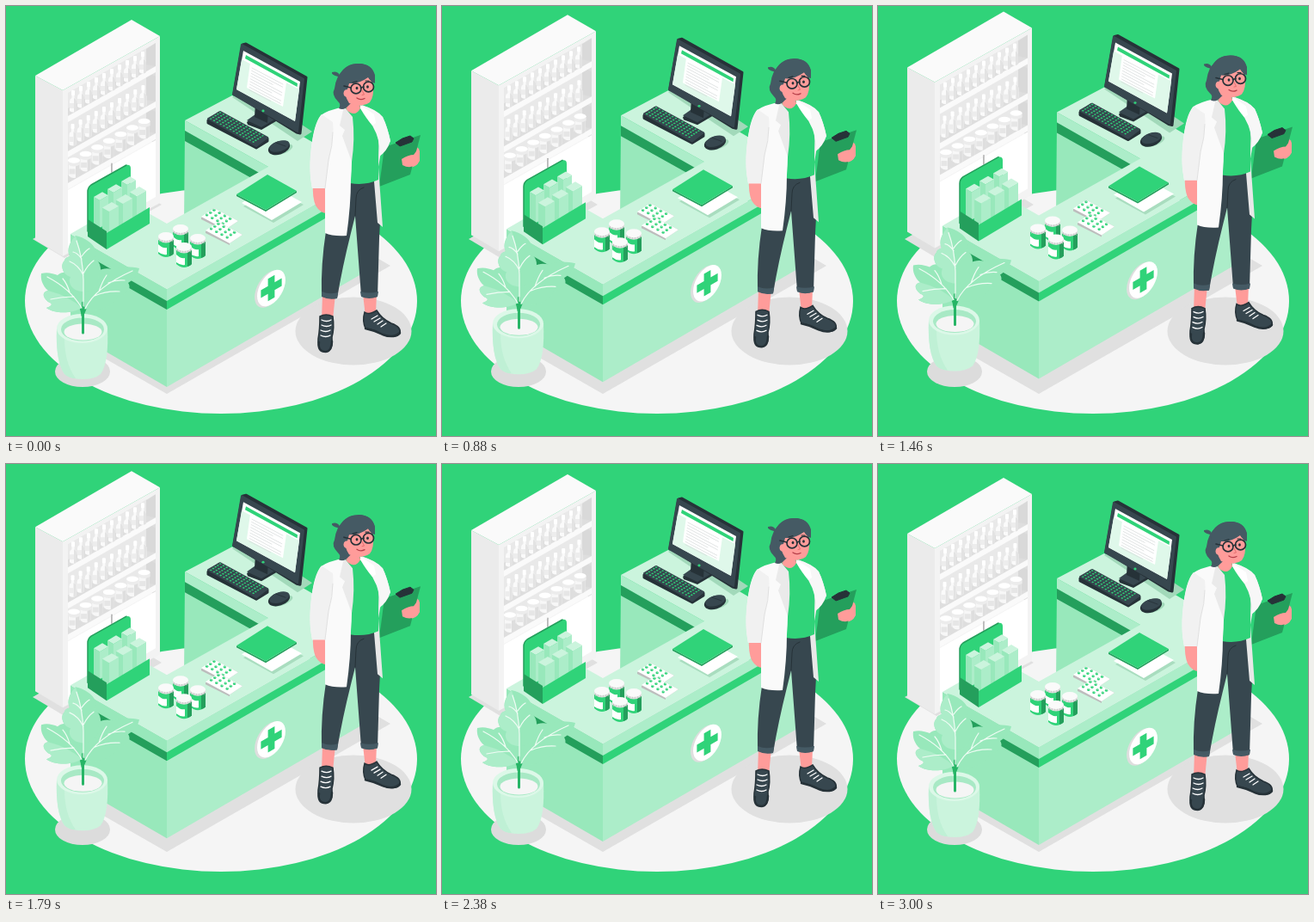
Animation, 500 px wide and 500 px high, one loop 3040 ms. Source, as an HTML page:

```html
<!DOCTYPE html>
<html lang="en">
<head>
<meta charset="utf-8">
<title>Pharmacy counter</title>
<style>
html, body { margin: 0; width: 100%; height: 100%; overflow: hidden; background: #30d379; }
svg { display: block; width: 100vw; height: 100vh; }
</style>
</head>
<body>
<svg id="stage" viewBox="0 0 500 500"></svg>
<script>
const GREEN = '#30d379', DEEP = '#249f5c', MINT = '#acedc9', PALE = '#cbf4dd', SOFT = '#98e8bb';
const DARK = '#37474f', SLATE = '#455a64', INK = '#263238', SKIN = '#ff9c9a', SHADE = '#e0e0e0';

const poly = (points, fill, extra = '') => `<polygon points="${points}" fill="${fill}" ${extra}/>`;
const path = (d, fill, extra = '') => `<path d="${d}" fill="${fill}" ${extra}/>`;
const line = (d, color, width = 1) =>
  `<path d="${d}" fill="none" stroke="${color}" stroke-width="${width}" stroke-linecap="round" stroke-linejoin="round"/>`;
const oval = (x, y, rx, ry, fill, extra = '') =>
  `<ellipse cx="${x}" cy="${y}" rx="${rx}" ry="${ry}" fill="${fill}" ${extra}/>`;
const group = (transform, body) => `<g transform="${transform}">${body}</g>`;
const repeat = (n, draw) => Array.from({ length: n }, (_, i) => draw(i)).join('');
const rounded = (color, width) => `stroke="${color}" stroke-width="${width}" stroke-linejoin="round"`;

// Isometric block standing on its nearest bottom corner
function block(x, y, left, right, height, colors) {
  const k = 0.577, top = y - height;
  const lx = x - left, ly = left * k, rx = x + right, ry = right * k;
  return poly(`${x},${y} ${lx},${y - ly} ${lx},${top - ly} ${x},${top}`, colors[0]) +
    poly(`${x},${y} ${rx},${y - ry} ${rx},${top - ry} ${x},${top}`, colors[1]) +
    poly(`${x},${top} ${lx},${top - ly} ${x - left + right},${top - ly - ry} ${rx},${top - ry}`, colors[2]);
}

function ground() {
  return oval(250, 343, 228, 131, '#f5f5f5') +
    poly('31,271 68,293 181,231 145,209', SHADE) +
    poly('75,387 187,451 447,302 411,281', SHADE) +
    oval(404, 378, 67.5, 39.5, SHADE) +
    oval(89, 425, 32, 18, '#dcdcdc');
}

const flask = (x, y) => group(`translate(${x} ${y})`,
  path('M-4 -1V-12Q-4 -15 -1.6 -16V-21H1.6V-16Q4 -15 4 -12V-1Q0 2 -4 -1', '#fafafa') +
  path('M1 .5V-16Q4 -15 4 -12V-1Q3 .3 1 .5', '#e3e3e3') +
  `<rect x="-2" y="-25" width="4" height="6" rx="1" fill="#fff"/>` +
  `<rect x="-4" y="-10" width="5" height="6" fill="#ededed"/>`);

const jar = (x, y) => group(`translate(${x} ${y})`,
  path('M-6 -2V-15H6V-2Q0 3 -6 -2', '#f7f7f7') +
  path('M2 .5V-15H6V-2Q4 .2 2 .5', '#dedede') +
  `<rect x="-5.5" y="-10" width="7" height="6" fill="#e6e6e6"/>` +
  path('M-7 -15V-20H7V-15Q0 -11 -7 -15', '#ececec') + oval(0, -20, 7, 3.2, '#fff'));

function shelf() {
  const board = y => poly(`72,${y} 163,${y - 52} 174,${y - 46} 174,${y - 51} 174,${y - 58} 163,${y - 60} 72,${y - 9}`, '#dedede') +
    poly(`72,${y} 174,${y - 58} 174,${y - 51} 72,${y + 7}`, '#fafafa');
  return poly('34,81 66,98 66,291 34,272', '#ebebeb') +
    poly('66,98 179,35 179,229 66,291', '#f3f3f3') +
    poly('72,101 174,43 174,152 72,208', '#e9e9e9') +
    poly('163,50 174,43 174,152 163,158', '#d9d9d9') +
    poly('34,81 146,16 179,35 66,98', '#fafafa') +
    [128, 169, 206].map(board).join('') +
    repeat(10, i => flask(78 + 9 * i, 123 - 5 * i)) +
    repeat(10, i => flask(77.5 + 9.1 * i, 162 - 5 * i)) +
    repeat(7, i => jar(79 + 13.6 * i, 199.5 - 7.6 * i)) +
    poly('72,214 174,156 174,222 72,281', '#fff') +
    line('M122.500 185V252', SHADE) + line('M123 183V193', '#9e9e9e', 1.2);
}

function counter() {
  return poly('208,145 305,199 305,195 207,254', SOFT) +
    poly('208,133 305,187 305,200 208,145', MINT) +
    poly('208,145 305,200 305,211 208,157', DEEP) +
    poly('75,285 187,349 187,443 75,378', SOFT) +
    poly('187,349 411,221 411,313 187,443', MINT) +
    poly('75,277 187,341 187,353 75,289', DEEP) +
    poly('187,341 411,212 411,224 187,353', GREEN) +
    poly('75,265 187,329 187,343 75,279', SOFT) +
    poly('187,329 411,201 411,214 187,343', MINT) +
    poly('208,133 263,104 411,190 411,201 187,329 75,265 141,227 187,253 305,187', PALE) +
    group('matrix(.866 -.5 0 1 306 329)', '<circle r="19.500" fill="#dedede"/>') +
    group('matrix(.866 -.5 0 1 308.500 328)', '<circle r="19" fill="#fff"/>' +
      path('M-4.500 -13H4.500V-4.500H14V4.500H4.500V13H-4.500V4.500H-14V-4.500H-4.500Z', GREEN));
}

function carton() {
  const pack = [SOFT, MINT, PALE];
  return path('M95 268V216Q95 211 99 208L140 185Q145 184 145 189V242Z', GREEN) +
    line('M95 262V216Q95 211 99 208L140 185', DEEP, 1.5) +
    repeat(3, i => block(109 + 16 * (2 - i), 258 - 9 * (2 - i), 7, 10, 32, pack)) +
    repeat(3, i => block(120 + 16 * (2 - i), 270 - 9 * (2 - i), 8, 11, 31, pack)) +
    poly('95,248 117,262 117,283 95,268', DEEP) +
    poly('117,264 167,234 167,253 117,283', GREEN);
}

function computer() {
  const lines = repeat(9, i => line(`M${286 - i * .4} ${72 + 3.2 * i}l${i % 3 == 2 ? 25 : 36} ${i % 3 == 2 ? 13 : 19}`, '#d5d8d8', .7));
  const keys = repeat(5, r => repeat(14, c =>
    poly('-1.300,-.1 .2,-1.100 1.800,-.2 .3,.8', GREEN, `transform="translate(${238 + 3.8 * c + 2.7 * r} ${131.300 + 2.07 * c - 1.800 * r})"`)));
  return poly('263,106 281,96 356,146 339,157', '#a2d9ba') +
    poly('280,135 297,122 314,131 314,134 297,144 281,138', INK) +
    poly('280,133 297,121 314,131 297,141', DARK) +
    poly('290,113 305,121 304,136 289,129', INK) +
    poly('275,45 279,44 349,83 342,148 338,147 265,102', INK, rounded(INK, 3)) +
    poly('274,45 346,85 339,146 264,103', DARK, rounded(DARK, 2)) +
    poly('276,52 342,88 336,134 268,97', '#fff') +
    poly('274,62 341,97 336,134 268,97', '#dff8ea') +
    poly('279,57 339,90 338.500,94 278,61', GREEN) +
    poly('284,66 326,89 322,117 280,95', '#fff') + lines +
    oval(299, 122, 1.6, 1.4, GREEN) +
    poly('235,133 248,124 304,154 304,157 291,165 235,136', INK, rounded(INK, 3)) +
    poly('235,131 249,123 304,153 291,163', DARK, rounded(DARK, 2)) + keys +
    oval(321, 167, 13, 5, '#a2d9ba', 'transform="rotate(-20 321 167)"') +
    oval(317.5, 165, 13, 7.5, INK, 'transform="rotate(-18 317.500 165)"') +
    oval(318, 163, 12, 6, DARK, 'transform="rotate(-18 318 163)"') +
    line('M314 159L325 163', INK, .8);
}

function blister(x, y) {
  const pill = (i, j) => oval(7 + 6.2 * i - 4.2 * j, 2.3 + 3.3 * i + 2.9 * j, 1.7, 1.5, GREEN) +
    line(`M${6 + 6.2 * i - 4.2 * j} ${1 + 3.3 * i + 2.9 * j}l2 1`, SOFT, 1);
  return group(`translate(${x} ${y})`,
    poly('-8,11 7,0 35,15 20,25 20,27 -8,13', '#bdbdbd') + poly('-8,10 7,0 35,15 20,25', '#fff') +
    repeat(4, i => repeat(3, j => pill(i, j))));
}

const medicine = (x, y) => group(`translate(${x} ${y})`,
  path('M-9 7V24Q0 32 9 24V7Z', GREEN) + path('M4 7V27Q8 26 9 24V7Z', DEEP) +
  path('M-9 13Q-4 18 1 17V25Q-4 26 -9 22Z', '#fff') +
  path('M-9 4V8Q0 15 9 8V4Z', '#dedede') +
  repeat(6, i => line(`M${-7.5 + 3 * i} 6v4`, '#bdbdbd', .6)) + oval(0, 4, 9, 5, '#fafafa'));

function papers() {
  return poly('276,233 311,214 346,231 311,252', '#a9ddbf') +
    poly('274,229 309,209 344,228 309,249', '#fff') +
    poly('268,219 302,237 338,215 338,217 302,239 268,221', DEEP) +
    poly('268,219 304,196 338,215 302,237', GREEN);
}

function plant() {
  const vein = d => line(d, '#effcf4', 1.2);
  return path('M59 375C58 400 61 418 68 428Q76 434 89 434Q103 434 110 428C117 418 119 400 118 375Z', PALE) +
    path('M59 375C58 400 61 418 68 428Q73 433 81 433C72 420 68 405 68 386Z', '#bff0d5') +
    oval(88.5, 375, 29.5, 17, '#dcf8e8') + oval(89, 376, 25, 13.5, '#a8e9c5') + oval(89.5, 379, 22, 9.5, '#f5f5f5') +
    line('M89.500 380V345M89 360Q88 350 83 345M90 357Q92 350 97 344', '#27b566', 3) +
    path('M92 352C88 340 96 324 101 318C104 306 114 304 124 306C134 302 146 303 155 305C153 314 147 319 142 322C147 329 139 337 130 337C126 350 108 356 92 352Z', SOFT) +
    path('M88 351C77 358 56 358 47 351C55 348 54 346 49 344C41 337 43 332 49 331C42 325 40 317 41 311C48 309 55 311 60 313C68 306 77 311 77 321C84 329 89 340 88 351Z', SOFT) +
    path('M88 351C77 358 56 358 47 351C55 348 54 346 49 344C41 337 43 332 49 331Q73 337 88 351Z', MINT) +
    path('M90 332C78 332 71 323 75 315C67 313 62 302 68 296C69 292 72 292 74 291C70 283 75 273 81 267C91 269 104 277 105 287L103 294C111 298 112 309 107 314C109 324 100 333 90 332Z', SOFT) +
    path('M90 332C78 332 71 323 75 315C67 313 62 302 68 296C69 292 72 292 74 291C70 283 75 273 81 267Q91 298 90 332Z', MINT) +
    vein('M90 349V318Q89 292 82 273M90 313Q84 301 74 297M90 311Q95 301 102 296M88 294Q83 287 78 286M88 291Q93 284 97 282') +
    vein('M88 351Q75 329 48 315M74 333Q71 323 66 317M79 338Q65 338 52 341') +
    vein('M92 352Q104 327 147 308M108 332Q112 320 117 313M103 337Q117 331 132 332M119 322Q128 318 138 319');
}

function shoe(d, laces) {
  return path(d, DARK, `stroke="${INK}" stroke-width="1.500"`) + line(laces, '#fff', 1.3);
}

function legs() {
  return path('M368 335L367 365H380L383 335ZM415 335L418 361L430 357L431 335Z', SKIN) +
    shoe('M365 361Q372 357 380 361Q382 374 379 385Q380 402 372 402Q362 402 363 387Q365 376 365 361Z',
      'M367 365q6 3 11 0M367 371q6 3 11 0M366 377q6 3 11 0M366 383q6 3 11 0') +
    line('M364 391Q362 402 372 402Q379 401 379 390', INK, 2.5) +
    shoe('M417 356Q422 360 431 354Q437 364 448 369Q460 373 458 381Q453 387 438 382Q428 376 418 375Q414 366 417 356Z',
      'M425 364l7 -4M428 367l7 -4M432 370l6 -4M436 373l6 -4') +
    line('M418 375Q428 377 438 382Q451 387 458 380', INK, 2.5) +
    path('M400 204L433 200Q437 230 434 270L432 338Q422 341 413 337L406 244L401 264Q391 304 385 340Q375 341 367 337Q366 300 372 262Z', DARK) +
    path('M367 332Q376 336 386 333L385 340Q375 342 367 338ZM412 332Q422 335 433 332L432 338Q422 342 413 338Z', SLATE) +
    line('M406 244L407 224Q407 214 416 211', INK, 1);
}

function clipboard() {
  return path('M461 177Q470 173 478 164L481 169V180Q477 188 468 188Q461 187 460 181Z', SKIN) +
    poly('440,164 482,150 470,196 434,210', DEEP) +
    poly('453,159 461,154 470,151 474,154 472,158 458,163', INK, rounded(INK, 1)) +
    path('M460 178Q468 173 474 173L480 165Q483 178 478 184Q470 190 461 185Z', SKIN);
}

function torso() {
  return path('M414 115Q430 121 438 129Q443 139 447 157L436 170L433 187L438 257L432 252L426 180Z', '#e8e8e8') +
    path('M396 119Q409 129 418 118L427 126Q435 150 433 176L433 202Q418 209 400 206Z', GREEN) +
    path('M393 108L410 108L412 119Q406 130 396 121Z', SKIN) +
    path('M412 115Q431 120 438 129Q444 142 447 157Q443 169 434 175Q437 158 426 139Z', '#f7f7f7') +
    path('M357 207Q356 222 360 232Q366 242 375 241Q379 239 376 229L373 221L379 224Q381 217 371 207Z', SKIN) +
    path('M394 117Q374 121 366 127Q358 137 355 165Q352 190 356 212L371 212L371 264Q380 268 396 267Q401 232 401 202Q405 157 394 117Z', '#fafafa') +
    path('M367 126Q357 140 354 173Q352 194 356 212L371 212L376 174Q382 150 380 135Z', '#f1f1f1') +
    line('M371 212L375 179Q380 162 380 147', '#dedede', .9) +
    path('M393 117L388 139L394 144L391 151L402 181Q406 155 403 129Z', '#eaeaea') +
    path('M412 115L428 126L430 136L426 139Q419 131 412 119Z', '#fff');
}

function head() {
  const lens = (x, y) => `<ellipse cx="${x}" cy="${y}" rx="6" ry="5.800" fill="none" stroke="${INK}" stroke-width="1.700"/>`;
  return path('M386 82Q378 80 379 77Q385 75 388 80Q395 67 409 67Q424 66 429 81L428 88L398 116Q393 122 387 119Q390 114 386 111Q378 103 382 96Q383 88 386 82Z', SLATE) +
    path('M398 88Q413 89 421 82L427 91Q428 106 423 112Q412 119 399 113Q393 104 394 94Z', SKIN) +
    path('M391 96Q396 94 398 98V106Q391 106 391 96Z', SKIN) +
    path('M388 79Q396 67 410 67Q426 67 429 81V90Q424 88 421 83Q410 91 399 90L397 97Q391 97 393 105Q386 97 388 79Z', SLATE) +
    lens(407, 96) + lens(421.500, 94) + line('M412.500 95L416 94M401 95L393 93', INK, 1.6) +
    oval(408, 95.5, 1.4, 1.8, INK) + oval(420.5, 94, 1.4, 1.8, INK) +
    line('M414 98L416.500 103L414 103.500', '#e56f70', 1) +
    line('M408 107Q412 110 417 107.500', '#b53f49', 1.3) +
    line('M403 89l5 -1.500M418 87l4 0', INK, 1.2);
}

const stage = document.getElementById('stage');
stage.innerHTML = '<rect width="500" height="500" fill="' + GREEN + '"/>' + ground() + '<g id="float">' +
  shelf() + counter() + carton() + computer() + papers() + blister(235, 235) + blister(240, 251) +
  [[203, 255], [186, 264], [223, 266], [207, 276]].map(p => medicine(...p)).join('') +
  plant() + legs() + clipboard() + torso() + head() + '</g>';

const floating = document.getElementById('float');
const LOOP = 3040, HALF = 1500, RISE = 9.7;

function render(time) {
  const t = Math.min(time % LOOP, 2 * HALF);
  const lift = RISE * (1 - Math.abs(t - HALF) / HALF);
  floating.setAttribute('transform', `translate(0 ${-lift})`);
}

const start = performance.now();
function tick() {
  render(performance.now() - start);
  requestAnimationFrame(tick);
}
tick();
</script>
</body>
</html>
```
